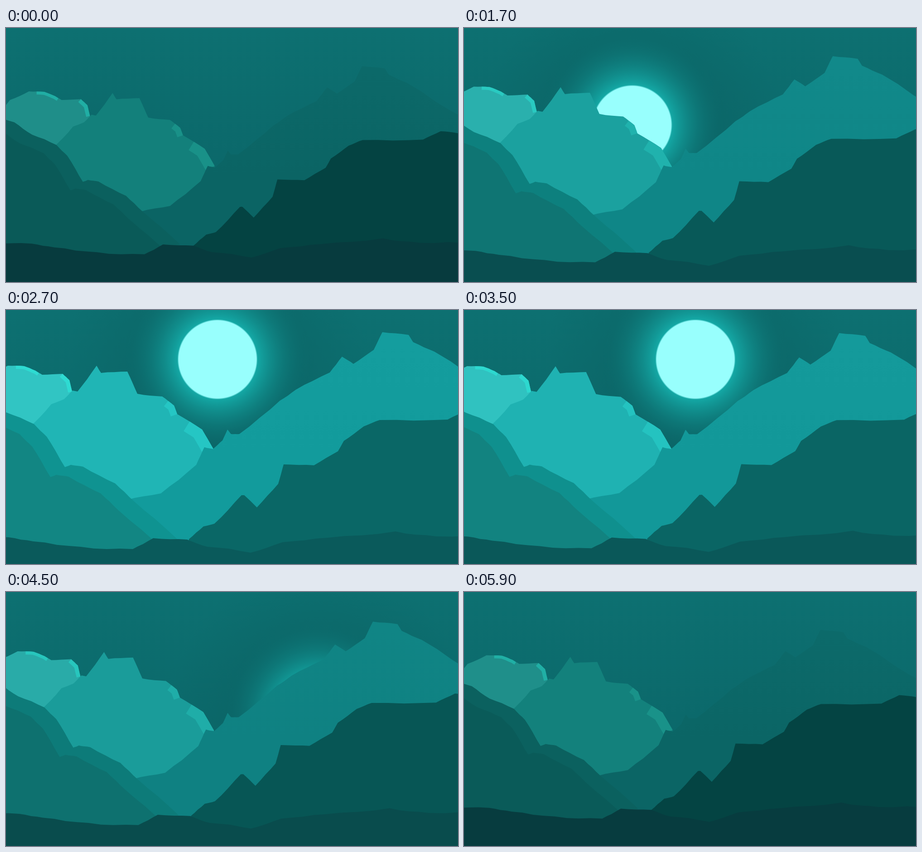
An HTML page with a canvas that plays this animation: 998x561 px, repeating every 6 s.

```html
<!DOCTYPE html>
<html lang="en">
<head>
<meta charset="utf-8">
<title>Moonrise over the mountains</title>
<style>
html, body { margin: 0; width: 100%; height: 100%; overflow: hidden; background: #0c6b6d; }
canvas { display: block; }
</style>
</head>
<body>
<canvas id="stage" width="998" height="561"></canvas>
<script>
const W = 998, H = 561, LOOP = 6000, STEP = 100;
const ctx = document.getElementById('stage').getContext('2d');

const lerp = (a, b, p) => a + (b - a) * p;

function mix([dark, light], p) {
  const part = (color, i) => parseInt(color.slice(1 + 2 * i, 3 + 2 * i), 16);
  return `rgb(${[0, 1, 2].map(i => Math.round(lerp(part(dark, i), part(light, i), p)))})`;
}

let seed = 7;
const random = () => (seed = seed * 16807 % 2147483647) / 2147483647;

// Midpoint displacement turns a few key points into a rough ridge.
function roughen(points, depth = 2) {
  if (!depth) return points;
  const finer = points.flatMap(([x, y], i) => {
    if (!i) return [[x, y]];
    const [px, py] = points[i - 1];
    const bump = (random() - 0.5) * 0.05 * Math.hypot(x - px, y - py);
    return [[(x + px) / 2, (y + py) / 2 + bump], [x, y]];
  });
  return roughen(finer, depth - 1);
}

function outline(points, closed) {
  const path = new Path2D();
  points.forEach(([x, y]) => path.lineTo(x, y));
  if (closed) {
    path.lineTo(points[points.length - 1][0], H + 150);
    path.lineTo(points[0][0], H + 150);
  }
  return path;
}

// Layers from back to front. Each zooms from `scale` to 1 about `center`;
// colours run from dark to bright. `lit` lists sunlit stretches: from x, to x, depth.
const layers = [
  {
    center: [935, 465], scale: 0.95, colors: ['#1f8e89', '#31c5c3'],
    litColors: ['#20aea4', '#2edbd2'], lit: [[18, 74, 14], [115, 147, 18]],
    ridge: [[-75, 190], [-40, 143], [4, 123], [40, 124], [65, 134], [80, 143], [125, 141], [140, 155], [146, 180]]
  },
  {
    center: [478, 285], scale: 0.873, colors: ['#13807b', '#20b5b5'],
    litColors: ['#199188', '#25c6c4'], lit: [[358, 379, 30], [405, 458, 50]],
    ridge: [[50, 262], [100, 208], [128, 197], [147, 178], [158, 180], [200, 123], [210, 139], [268, 136],
      [290, 185], [345, 191], [371, 211], [378, 230], [433, 264], [458, 307]]
  },
  {
    center: [494, 314], scale: 0.867, colors: ['#0b6464', '#129b9c'],
    topColors: ['#0c6969', '#149d9e'],
    ridge: [[265, 420], [342, 405], [420, 342], [438, 303], [457, 307], [478, 288], [489, 264], [497, 274],
      [515, 274], [605, 200], [640, 176], [715, 138], [742, 103], [767, 119], [812, 88], [831, 49], [889, 55],
      [899, 71], [946, 92], [1090, 180]]
  },
  {
    center: [414, 296], scale: 0.86, colors: ['#0b605e', '#0f9391'],
    shadeColors: ['#0a5a58', '#128683'], shadeShift: [-32, 22],
    ridge: [[-90, 180], [-46, 194], [0, 226], [62, 252], [90, 280], [130, 347], [143, 342], [170, 346],
      [241, 383], [282, 422], [378, 506]]
  },
  {
    center: [490, 283], scale: 0.888, colors: ['#044342', '#0a6766'],
    ridge: [[404, 506], [436, 478], [460, 472], [520, 409], [526, 409], [554, 436], [601, 384], [613, 341],
      [680, 343], [733, 312], [746, 289], [790, 257], [825, 243], [975, 242], [1019, 221], [1062, 226], [1110, 235]]
  },
  {
    center: [560, 222], scale: 0.908, colors: ['#073b3e', '#0a5a5b'],
    ridge: [[-100, 505], [6, 502], [60, 511], [165, 523], [280, 528], [325, 504], [400, 507], [445, 523],
      [540, 536], [610, 513], [710, 503], [860, 489], [950, 500], [1090, 503]]
  }
];

for (const layer of layers) {
  const points = roughen(layer.ridge);
  layer.body = outline(points, true);
  layer.litEdges = (layer.lit || []).map(([from, to, depth]) =>
    ({ path: outline(points.filter(([x]) => x >= from && x <= to)), depth }));
}

// Part steady, part eased zoom in, then back out.
function zoomAt(t) {
  const steady = 1 - Math.abs(t - LOOP / 2) / (LOOP / 2);
  const eased = (1 - Math.cos(2 * Math.PI * t / LOOP)) / 2;
  return (steady + eased) / 2 / 0.938;
}

// The moon climbs a straight slope, slows at the top and falls down the other side.
function moonAt(t) {
  const d = (t - 3100) / 400;
  const rising = d < 0, away = Math.abs(d) ** (rising ? 1.4 : 1.7);
  return [487 + (rising ? -20 : 24) * away, 87 + 22 * away];
}

function drawSky() {
  const sky = ctx.createLinearGradient(0, 0, 0, 320);
  sky.addColorStop(0, '#0d7071');
  sky.addColorStop(1, '#0b686a');
  ctx.fillStyle = sky;
  ctx.fillRect(0, 0, W, H);
}

function fillRadial(x, y, inner, outer, color, alphaAt) {
  const fill = ctx.createRadialGradient(x, y, inner, x, y, outer);
  for (let u = 0; u <= 1; u += 0.125) fill.addColorStop(u, `rgba(${color},${alphaAt(u)})`);
  ctx.fillStyle = fill;
  ctx.fillRect(0, 0, W, H);
}

function drawMoon(t) {
  const [x, y] = moonAt(t), radius = 87;
  fillRadial(x, y, radius, 330, '10,94,95', u => 0.5 * (1 - u));
  fillRadial(x, y, radius, 205, '22,185,181', u => 0.8 * (1 - u) ** 2);
  fillRadial(x, y, radius - 1.5, radius + 1.5, '152,255,253', u => 1 - u);
}

function drawLayer(layer, p) {
  const s = lerp(layer.scale, 1, p), [cx, cy] = layer.center;
  ctx.save();
  ctx.transform(s, 0, 0, s, cx * (1 - s), cy * (1 - s));
  ctx.fillStyle = mix(layer.colors, p);
  if (layer.topColors) {
    const shade = ctx.createLinearGradient(0, 60, 0, 330);
    shade.addColorStop(0, mix(layer.topColors, p));
    shade.addColorStop(1, mix(layer.colors, p));
    ctx.fillStyle = shade;
  }
  ctx.fill(layer.body);
  if (layer.shadeColors) {
    ctx.translate(...layer.shadeShift);
    ctx.fillStyle = mix(layer.shadeColors, p);
    ctx.fill(layer.body);
  }
  if (layer.lit) {
    ctx.clip(layer.body);
    ctx.strokeStyle = mix(layer.litColors, p);
    for (const { path, depth } of layer.litEdges) {
      ctx.lineWidth = depth;
      ctx.stroke(path);
    }
  }
  ctx.restore();
}

function draw(now) {
  const t = Math.floor(now % LOOP / STEP) * STEP, p = zoomAt(t);
  drawSky();
  drawMoon(t);
  layers.forEach(layer => drawLayer(layer, p));
  requestAnimationFrame(() => draw(performance.now() - start));
}

const start = performance.now();
draw(0);
</script>
</body>
</html>
```
